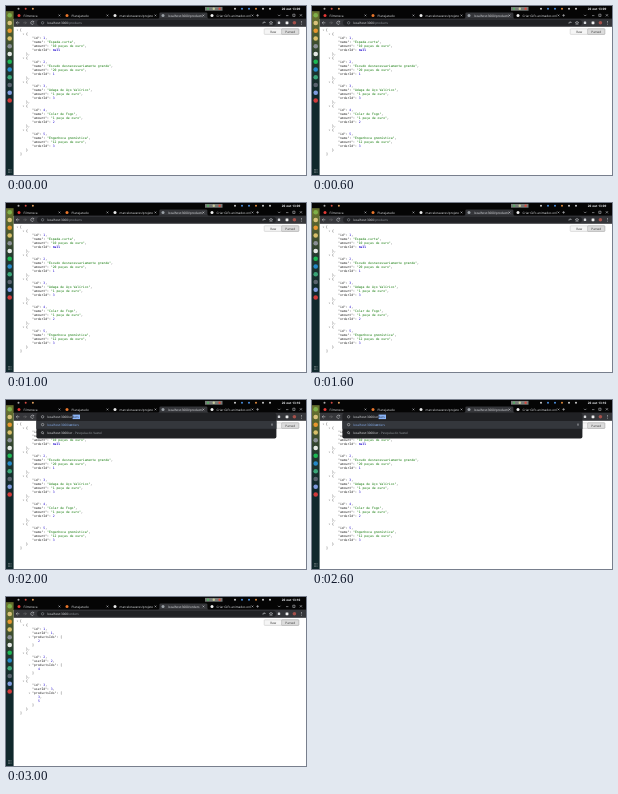
Recreate the animation shown at these times as an HTML page. Size 300x169 px, loop 4 s.

```html
<!DOCTYPE html>
<html lang="pt-BR">
<head>
<meta charset="utf-8">
<title>Produtos e pedidos</title>
<style>
html, body { margin: 0; width: 100%; height: 100%; overflow: hidden; background: #fff; }
svg { display: block; width: 100vw; height: 100vh; }
text { font-family: "Open Sans", "Noto Sans", sans-serif; font-size: 3.1px; fill: #e8eaed; text-rendering: geometricPrecision; white-space: pre; }
.json text { font-family: "DejaVu Sans Mono", monospace; font-size: 3.14px; fill: #222; }
.json .str { fill: #0b7500; }
.json .num { fill: #1a01cc; }
.json .nul { fill: #1a01cc; font-weight: bold; }
.line { fill: none; stroke: #d5d7da; stroke-width: .5; }
.dim { fill: #9aa0a6; }
.link { fill: #8ab4f8; }
.dark { fill: #333; }
.products, .orders, .typing, .early, .late { animation: 4s step-end infinite; }
.products { animation-name: products; }
.orders { animation-name: orders; }
.typing { animation-name: typing; }
.early { animation-name: early; }
.late { animation-name: late; }
@keyframes products { 0% { visibility: visible } 75%, 100% { visibility: hidden } }
@keyframes orders { 0% { visibility: hidden } 75%, 100% { visibility: visible } }
@keyframes typing { 0% { visibility: hidden } 50% { visibility: visible } 75%, 100% { visibility: hidden } }
@keyframes early { 0% { visibility: visible } 50%, 100% { visibility: hidden } }
@keyframes late { 0% { visibility: hidden } 50%, 100% { visibility: visible } }
</style>
</head>
<body>
<svg viewBox="0 0 300 169" preserveAspectRatio="none">
  <defs>
    <linearGradient id="wall" x2="0" y2="1">
      <stop offset=".03" stop-color="#66702f"/>
      <stop offset=".3" stop-color="#24382f"/>
      <stop offset=".5" stop-color="#10282c"/>
    </linearGradient>
  </defs>
  <rect width="300" height="169" fill="#fff"/>
  <g id="products" class="json products"></g>
  <g id="orders" class="json orders"></g>

  <!-- view buttons -->
  <rect x="258.2" y="22.8" width="34.6" height="5.6" rx=".6" fill="#f5f5f5" stroke="#b4b4b4" stroke-width=".4"/>
  <rect x="275.6" y="22.8" width="17.2" height="5.6" rx=".6" fill="#dcdcdc" stroke="#999" stroke-width=".4"/>
  <text class="dark" x="264.2" y="26.7">Raw</text>
  <text class="dark" x="279.3" y="26.7">Parsed</text>

  <!-- window and desktop bars -->
  <rect width="300" height="13" fill="#050505"/>
  <rect x="7.5" y="12.6" width="292.5" height="8.2" fill="#35363a"/>
  <path d="M152 12.8Q153.4 12.6 153.4 11V7.6Q153.4 6.4 154.8 6.4H200Q201.4 6.4 201.4 7.6V11Q201.4 12.6 202.8 12.8Z" fill="#35363a"/>
  <rect y="5.2" width="7.6" height="163.8" fill="url(#wall)"/>
  <g id="dock"></g>
  <g id="tray"></g>

  <text class="early" x="275.8" y="3.8" font-weight="bold">20 out 13:09</text>
  <text class="late" x="275.8" y="3.8" font-weight="bold">20 out 13:10</text>

  <g id="tabs"></g>
  <text class="products" x="162" y="10.6">localhost:3000/products</text>
  <text class="orders" x="162" y="10.6">localhost:3000/orders</text>
  <path class="line" d="M250.2 9.4h2.8M251.6 8v2.8M272 8.8l1.2 1.2 1.2-1.2M280 9.6h2.4M286.8 8.2h2.2v2.2h-2.2zM293.8 8.2l2.2 2.2m0-2.2l-2.2 2.2"/>

  <!-- address bar -->
  <path class="line" d="M13.4 16.8h-3.2m1.4-1.4l-1.4 1.4 1.4 1.4"/>
  <path class="line" style="stroke:#777" d="M17.2 16.8h3.2m-1.4-1.4l1.4 1.4-1.4 1.4"/>
  <path class="line" d="M27.6 15.8a1.6 1.6 0 1 0 .2 1.6m-.1-2.5v1.2h-1.2"/>
  <rect x="31" y="13.8" width="239" height="6" rx="3" fill="#202124"/>
  <circle class="line" cx="36.6" cy="16.8" r="1.2" style="stroke:#9aa0a6"/>
  <text class="products" x="41.2" y="17.9">localhost:3000<tspan class="dim">/products</tspan></text>
  <text class="orders" x="41.2" y="17.9">localhost:3000<tspan class="dim">/orders</tspan></text>
  <g id="tools">
    <path class="line" d="M257 17.8v-1.5h2.2m-.7-.7l.7.7-.7.7M265 15.2l.5 1.1 1.2.1-.9.8.3 1.2-1.1-.6-1.1.6.3-1.2-.9-.8 1.2-.1z"/>
    <rect x="271.8" y="15.6" width="2.4" height="2.4" rx=".5" fill="#d5d7da"/>
    <rect x="279.6" y="15.4" width="2.8" height="2.8" rx=".4" fill="#eee"/>
    <circle cx="288.4" cy="16.8" r="1.8" fill="#a6504a"/>
    <path d="M295 15.1h.7v.7H295zM295 16.5h.7v.7H295zM295 17.9h.7v.7H295z" fill="#d5d7da"/>
  </g>

  <!-- address suggestions -->
  <g class="typing">
    <rect x="30.4" y="13" width="240" height="25.6" rx="1.8" fill="#202124"/>
    <rect x="30.4" y="21" width="240" height="7.8" fill="#34373c"/>
    <circle class="line" cx="36.6" cy="16.8" r="1.2"/>
    <circle class="line" cx="36.6" cy="24.6" r="1.2"/>
    <circle class="line" cx="36.4" cy="32.6" r="1"/>
    <path class="line" d="M37.1 33.3l.9.9M265.2 23.8l1.6 1.6m0-1.6l-1.6 1.6"/>
    <rect x="66.6" y="14.6" width="7.4" height="4.5" fill="#8ab4f8"/>
    <text x="41.2" y="17.9">localhost:3000/or<tspan fill="#202124">ders</tspan></text>
    <text class="link" x="41.2" y="25.7">localhost:3000/<tspan font-weight="bold">or</tspan>ders</text>
    <text x="41.2" y="33.8">localhost:3000/or<tspan class="dim"> - Pesquisa do Vastel</tspan></text>
  </g>
</svg>
<script>
const NS = "http://www.w3.org/2000/svg";
const $ = id => document.getElementById(id);

function add(parent, tag, attrs, text) {
  const el = document.createElementNS(NS, tag);
  for (const key in attrs) el.setAttribute(key, attrs[key]);
  if (text !== undefined) el.textContent = text;
  return parent.appendChild(el);
}

const dot = (parent, cx, cy, r, fill) => add(parent, "circle", { cx, cy, r, fill });

function kind(token) {
  if (token === "null") return "nul";
  return /^\d/.test(token) ? "num" : "str";
}

function showJson(group, data) {
  JSON.stringify(data, null, 1).split("\n").forEach((row, i) => {
    const body = row.trimStart();
    const x = 14 + 6 * (row.length - body.length);
    const y = 24 + 4 * i;
    const line = add(group, "text", { x, y: y + 1.2 });
    const [, key, rest] = body.match(/^("\w+": )?(.*)$/);
    if (key) add(line, "tspan", {}, key);
    const [, value, tail] = rest.match(/^(".*"|\d+|null)?(.*)$/);
    if (value) add(line, "tspan", { class: kind(value) }, value);
    add(line, "tspan", {}, tail);
    if (/[[{]$/.test(body))
      add(group, "path", { d: `M${x - 3.4} ${y - .3}h1.6l-.8 1z`, fill: "#888" });
  });
}

const item = (id, name, gold, orderId) =>
  ({ id, name, amount: `${gold} peça${gold > 1 ? "s" : ""} de ouro`, orderId });
const order = (id, userId, ...productsIds) => ({ id, userId, productsIds });

showJson($("products"), [
  item(1, "Espada-curta", 10, null),
  item(2, "Escudo desnecessariamente grande", 20, 1),
  item(3, "Adaga de Aço Valírico", 1, 3),
  item(4, "Colar de Fogo", 1, 2),
  item(5, "Engenhoca gnomística", 12, 3)
]);
showJson($("orders"), [order(1, 1, 2), order(2, 2, 4), order(3, 3, 3, 5)]);

["#7fb04a", "#d8c27a", "#e8962e", "#d9c06a", "#8a8f95", "#e4e8e4",
  "#1db954", "#2489ca", "#3aa678", "#5a6470", "#7f9be0", "#d23a3a"
].forEach((color, i) => dot($("dock"), 3.7, 9.2 + 7.75 * i, 2.3, color));
for (let i = 0; i < 9; i++)
  dot($("dock"), 2.4 + 1.3 * (i % 3), 163.6 + 1.3 * Math.floor(i / 3), .35, "#ddd");

["#aaa", "#d04a43", "#e0a060"].forEach((color, i) =>
  dot($("tray"), 12.5 + 7.2 * i, 2.7, 1, color));
add($("tray"), "rect", { x: 199, y: .9, width: 17.5, height: 3.8, fill: "#777b78" });
["#5aa866", "#c9cc9a", "#d84b40"].forEach((color, i) =>
  dot($("tray"), 202 + 5.8 * i, 2.8, 1.2, color));
["#ccc", "#4b8fe0", "#4b8fe0", "#e08a3c", "#ccc", "#ccc"].forEach((color, i) =>
  dot($("tray"), 229 + 7 * i, 2.7, 1, color));

[
  [13, "#e53935", "Filmoteca"],
  [61, "#e8762c", "Planejatudo"],
  [109, "#e8e8e8", "marcelotavares/projeto"],
  [157, "#9aa0a6", ""],
  [206, "#f0f0f0", "Criar GIFs animados onl"]
].forEach(([x, color, title]) => {
  const tabs = $("tabs");
  dot(tabs, x, 9.5, 1.5, color);
  add(tabs, "text", { x: x + 4.5, y: 10.6 }, title);
  add(tabs, "path", { class: "line", d: `M${x + 39.6} 8.6l1.7 1.7m0-1.7l-1.7 1.7` });
});
</script>
</body>
</html>
```
